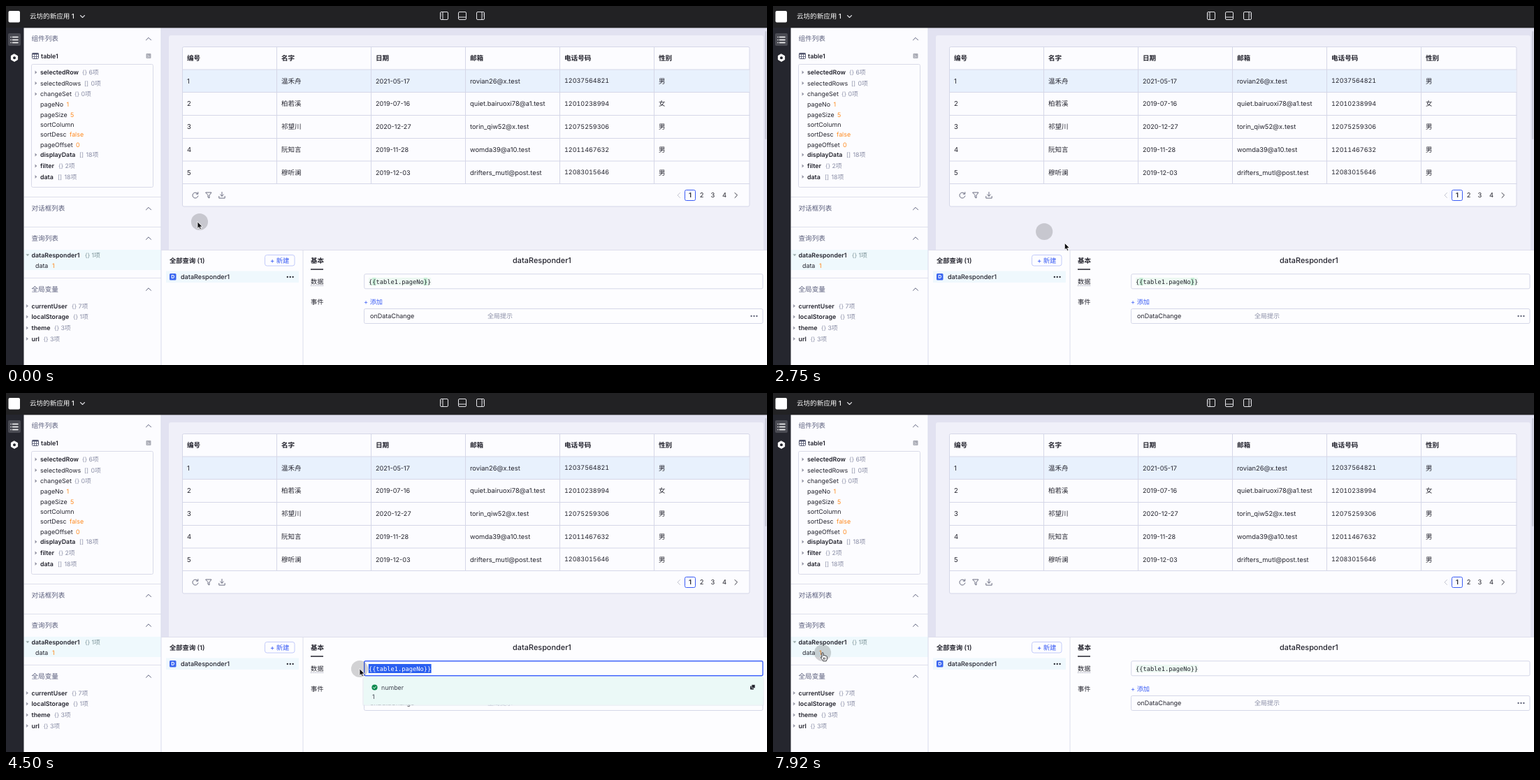
An HTML page that plays this animation: 1089x514 px, repeating every 8000 ms.

```html
<!DOCTYPE html>
<html lang="zh-CN">
<head>
<meta charset="utf-8">
<title>云坊的新应用 1</title>
<style>
html, body { margin: 0; width: 100%; height: 100%; overflow: hidden; background: #fcfcff; }
svg { display: block; width: 1089px; height: 514px; }
text { font-family: Inter, "Noto Sans CJK SC", "Noto Sans CJK", "Noto Sans", sans-serif; white-space: pre; text-rendering: geometricPrecision; }
.mono { font-family: "DejaVu Sans Mono", "Noto Sans Mono", monospace; }
.tab { font-variant-numeric: tabular-nums; }
</style>
</head>
<body>
<svg id="stage" viewBox="0 0 1089 514" xmlns="http://www.w3.org/2000/svg"></svg>
<script>
const INK = '#24242e', GREY = '#8a8ea6', HEAD = '#5d617e', ORANGE = '#ff8a1f', BLUE = '#3a5cf5', LINE = '#d5d7e8';

// y is the optical middle of the text
const text = (x, y, s, o = {}) =>
  `<text x="${x}" y="${y + (o.size || 8.85) * 0.36}" font-size="${o.size || 8.85}" font-weight="${o.w || 400}" fill="${o.c || INK}" text-anchor="${o.a || 'start'}" class="${o.k || ''}">${s}</text>`;
const rect = (x, y, w, h, fill, extra = '') =>
  `<rect x="${x}" y="${y}" width="${w}" height="${h}" fill="${fill}" ${extra}/>`;
const frame = (x, y, w, h, stroke, r = 2, fill = 'none') =>
  rect(x, y, w, h, fill, `stroke="${stroke}" rx="${r}"`);
const path = (d, stroke, w = 1, fill = 'none') =>
  `<path d="${d}" stroke="${stroke}" stroke-width="${w}" fill="${fill}" stroke-linecap="round" stroke-linejoin="round"/>`;
const rule = (x, y, x2, y2, c = LINE) => path(`M${x} ${y}L${x2} ${y2}`, c);
const dots = (x, y, c) => [0, 3.9, 7.8].map(d => `<circle cx="${x + d}" cy="${y}" r="1.15" fill="${c}"/>`).join('');
const group = (id, body, extra = '') => `<g id="${id}" ${extra}>${body}</g>`;

function topBar() {
  const icon = (x, d) => frame(x - 5.5, 8.5, 11, 11, '#e4e4e8', 1.5) + path(d, '#e4e4e8');
  return rect(0, 0, 1089, 31.35, '#222224') + rect(0, 31, 25.5, 483, '#25262e') +
    rect(3.5, 7, 16.5, 16.5, '#fff', 'rx="2"') +
    text(34, 15, '云坊的新应用 1', { size: 9.55, w: 500, c: '#fff' }) +
    path('M106.5 13.5l3 3l3 -3', '#d8d8dc', 1.1) +
    icon(627, 'M625 8.5v11M623 11.5h0M623 14h0') + icon(653, 'M647.5 16h11') + icon(679, 'M681 8.5v11M683 11.5h0M683 14h0') +
    rect(3, 39, 18, 18, '#4a4b53', 'rx="2"') +
    path('M9.5 44.5h7.5M9.5 48.5h7.5M9.5 52.5h7.5M7 44.5h0M7 48.5h0M7 52.5h0', '#fff', 1.5) +
    path('M12 69l4.6 2.6v5.2l-4.6 2.6l-4.6 -2.6v-5.2z', '#fff', 1, '#fff') + '<circle cx="12" cy="74.2" r="2" fill="#25262e"/>';
}

function sidePanel() {
  const section = (y, s) => text(36.5, y, s, { size: 9.6, w: 500, c: HEAD }) +
    path(`M200.5 ${y + 1.8}l3.5 -3.5l3.5 3.5`, HEAD);
  const arrow = (x, y) => path(`M${x - 1} ${y - 2}l2.4 2l-2.4 2z`, '#8e90a0', .3, '#8e90a0');
  // name, x, y, bracket, bracket x, count
  const node = (s, x, y, b, bx, n, w = 600) => arrow(x - 6.2, y) + text(x, y, s, { w }) +
    text(bx, y, b, { c: GREY, size: 8.4 }) + text(bx + 9.4, y, n + '项', { c: GREY });
  const prop = (s, x, y, vx, v) => text(x, y, s) + (v ? text(vx, y, v, { c: ORANGE }) : '');
  return rect(25.5, 31, 196.5, 483, '#fcfcff') + rect(25.5, 349, 196.5, 29, '#eff9fd') +
    section(47, '组件列表') + section(290, '对话框列表') + section(332.5, '查询列表') + section(405.5, '全局变量') +
    frame(37.5, 67.5, 9, 8, '#555970', 1) + rect(37.5, 67.5, 9, 2, '#555970') + path('M37.5 72.5h9M40.5 69v6.5M43.5 69v6.5', '#555970', .8) +
    text(50, 71.5, 'table1', { w: 600 }) +
    rect(200.5, 68, 7, 7, '#a9abb5', 'rx="1"') + path('M202.3 70l3.4 3.2M202.3 73.2h1.5', '#f0f0f4', .7) +
    frame(36.5, 83.5, 174, 176, '#d9dae8') +
    node('selectedRow', 49, 95, '{}', 109, 6) + node('selectedRows', 49, 110.5, '[]', 112, 0, 400) +
    node('changeSet', 49, 126, '{}', 98, 0, 400) +
    prop('pageNo', 49, 141, 86.5, '1') + prop('pageSize', 49, 155.5, 92, '5') + prop('sortColumn', 49, 170) +
    prop('sortDesc', 49, 184, 91, 'false') + prop('pageOffset', 49, 198.5, 100, '0') +
    node('displayData', 49, 213, '[]', 105, 18) + node('filter', 49, 229, '{}', 75, 2) + node('data', 49, 244.5, '[]', 74, 18) +
    [273.5, 316.5, 389.5].map(y => rule(26, y, 222, y, '#dfe0ec')).join('') +
    path('M29 355.4h4l-2 2.4z', '#8ea0a0', .3, '#8ea0a0') +
    text(36.5, 356.5, 'dataResponder1', { w: 600 }) +
    text(113, 356.5, '{}', { c: '#7c9499', size: 8.4 }) + text(122.5, 356.5, '1项', { c: '#7c9499' }) +
    prop('data', 42, 371.5, 66, '1') +
    node('currentUser', 36.5, 429.5, '{}', 94, 7) + node('localStorage', 36.5, 445, '{}', 96, 1) +
    node('theme', 36.5, 461, '{}', 69, 3) + node('url', 36.5, 476.5, '{}', 53.5, 3);
}

const COLS = [253, 388, 523, 658, 793, 928];
const ROWS = [59, 91, 123.5, 156.5, 189.5, 222, 254.5];
const PEOPLE = [
  ['1', '温禾舟', '2021-05-17', 'rovian26@x.test', '12037564821', '男'],
  ['2', '柏若溪', '2019-07-16', 'quiet.bairuoxi78@a1.test', '12010238994', '女'],
  ['3', '祁望川', '2020-12-27', 'torin_qiw52@x.test', '12075259306', '男'],
  ['4', '阮知言', '2019-11-28', 'womda39@a10.test', '12011467632', '男'],
  ['5', '穆听澜', '2019-12-03', 'drifters_mutl@post.test', '12083015646', '男']
];

function canvasArea() {
  const heads = ['编号', '名字', '日期', '邮箱', '电话号码', '性别'];
  const sizes = [9.5, 9.5, 9.1, 9.35, 9, 9.5];
  let s = rect(222, 31, 867, 320, '#e2e2f1') + rect(233, 42, 851, 320, '#f0f0f9', 'rx="3"') +
    rect(1086, 36, 2.5, 155, '#c9cad8', 'rx="1.2"') +
    frame(252.5, 58.5, 811.5, 228.5, LINE, 2, '#fcfcff') +
    rect(253, 91, 810.5, 32.5, '#e8f1fd') + group('hover', rect(253, 222, 810.5, 32.5, '#f4f6fe'), 'display="none"');
  ROWS.slice(1).forEach(y => s += rule(253, y, 1064, y));
  COLS.slice(1).forEach(x => s += rule(x - .5, 59, x - .5, 254.5));
  heads.forEach((h, i) => s += text(COLS[i] + 6, 75, h, { size: 9.6, w: 600 }));
  PEOPLE.forEach((p, r) => p.forEach((v, i) =>
    s += text(COLS[i] + 6, (ROWS[r + 1] + ROWS[r + 2]) / 2, v, { size: sizes[i], k: i === 4 ? 'tab' : '' })));
  const c = '#5a5d72';
  s += path('M274.3 268.8a4 4 0 1 0 .6 3.2M274.8 266.6v2.6h-2.6', c, .9) +
    path('M286 267h8l-3 4v4l-2 -1.2v-2.8z', c, .9) +
    path('M309 266.5v5.6M306.6 270l2.4 2.3l2.4 -2.3M304.8 272.5v2.6h8.4v-2.6', c, .9) +
    path('M964.5 267.5l-3.5 3.5l3.5 3.5', '#c4c6d2') + path('M1043 267.5l3.5 3.5l-3.5 3.5', '#33343f') +
    frame(971.5, 263.5, 15, 15, BLUE);
  [979, 995.5, 1011.5, 1028].forEach((x, i) => s += text(x, 271, i + 1, { size: 9.4, w: i ? 400 : 600, a: 'middle' }));
  return s;
}

const CODE = '{{table1.pageNo}}', CODE_X = 519, CHAR = 5.25;
const code = c => text(CODE_X, 394.5, CODE, { size: 8.72, c, k: 'mono' });

function queryPanel() {
  const match = x => rect(x, 389, CHAR, 11, '#c9efd8');
  const popup = rect(510, 407, 575, 41, '#dfe6ee', 'opacity=".5" rx="2"') + rect(512, 406, 571.5, 40.5, '#ebf9f7') +
    '<circle cx="527.5" cy="421.5" r="4.1" fill="#0e8a4f"/>' + path('M525.6 421.6l1.4 1.4l2.4 -2.7', '#fff', .9) +
    text(537, 421.5, 'number', { c: '#3f434f' }) + text(524, 435, '1', { c: '#3f434f' }) +
    rect(1065, 419.5, 5, 5, INK, 'rx=".8"') + rect(1067, 417.5, 5, 5, INK, 'rx=".8" stroke="#ebf9f7" stroke-width=".7"');
  return rect(222, 349, 867, 1.5, '#dedeec') + rect(222, 350, 867, 164, '#fdfdff') +
    rule(222, 31, 222, 514, '#d9dbec') + rule(425, 350, 425, 514, '#dcdeec') +
    text(234, 364.5, '全部查询 (1)', { size: 9.3, w: 600 }) +
    frame(370.5, 356.5, 42.5, 15.5, '#c3cbfa', 3, '#fdfdff') + text(391.7, 364.5, '+ 新建', { size: 9.4, w: 500, c: BLUE, a: 'middle' }) +
    rect(229, 379.5, 190, 16.5, '#eff8fd') + rect(234, 383, 9.5, 9.5, '#3a66f0', 'rx="1.5"') +
    text(238.8, 387.8, 'D', { size: 7, w: 700, c: '#fff', a: 'middle' }) +
    text(250, 387.8, 'dataResponder1', { size: 9.1, w: 500 }) + dots(402.8, 388, INK) +
    text(436, 364.5, '基本', { size: 9.5, w: 600 }) + rect(436, 376.3, 18, 1.5, INK) +
    text(767, 364.5, 'dataResponder1', { size: 10.9, w: 500, a: 'middle' }) +
    text(436, 394.5, '数据', { size: 9.2 }) + '<path d="M436 400.5h18" stroke="#9a9cb0" stroke-dasharray="1.4 1.4"/>' +
    text(436, 423.5, '事件', { size: 9.2 }) + text(512, 423.5, '+ 添加', { size: 9.2, c: BLUE }) +
    frame(512.5, 433.5, 570.5, 21, LINE) + text(521, 444, 'onDataChange', { size: 9 }) +
    text(689, 444, '全局提示', { size: 9, c: GREY }) + dots(1066.6, 444, '#5d6076') +
    group('popup', popup) +
    '<rect id="field" x="512.7" y="383.8" width="570.3" height="21" rx="2" fill="#fdfdff"/>' +
    rect(CODE_X, 389, CHAR * 17, 11, '#edf9f2') +
    group('match', match(CODE_X + CHAR) + match(CODE_X + CHAR * 15)) + code(INK) +
    group('expand', frame(1068, 389.5, 9.5, 9, '#c4c6d0', 1.5) + path('M1070.5 392h1.5M1070.5 392v1.5M1071 392.5l4 3.5M1075 394.5v1.5h-1.5', '#8a8da0', .8)) +
    '<clipPath id="clip"><rect id="clipBox" y="386" height="17"/></clipPath>' +
    group('pick', rect(CODE_X - .5, 388, CHAR * 17 + 1, 13, '#2a5ff0') + code('#fff'), 'clip-path="url(#clip)"');
}

const tip = rect(98.5, 131, 122, 24, '#9a9ab0', 'opacity=".18" rx="4"') + rect(98.5, 129.5, 121.5, 23, '#29292c', 'rx="2"') +
  text(104, 141.2, '当前展示第几页，从1开始', { size: 9.6, c: '#fff' });

const pointer =
  group('arrow', path('M0 0v9.6l2.2 -2l1.5 3.4l1.7 -.8l-1.5 -3.2h3z', '#fff', .8, '#0c0c10')) +
  group('hand', path('M-1.2 .8a1.1 1.1 0 0 1 2.2 0v3.4l.4 -.4a1 1 0 0 1 1.7 .5a1 1 0 0 1 1.7 .5a1 1 0 0 1 1.5 .9v2.5c0 2 -1 2.4 -1 3.6h-4.6c-.4 -1.8 -2 -2.6 -3 -4.6c-.5 -1.2 .5 -1.7 1.1 -1zM1.4 7v2.4M3.2 7v2.4', '#16161a', .85, '#fff')) +
  group('beam', path('M-2 -5.5q2 0 2 1.5v8q0 1.5 -2 1.5M2 -5.5q-2 0 -2 1.5v8q0 1.5 2 1.5M-1.2 1.5h2.4', '#2a2a30', .9));

document.getElementById('stage').innerHTML = canvasArea() + sidePanel() + queryPanel() + topBar() + group('tip', tip) +
  '<g id="halo"><circle r="12.1" fill="#000" fill-opacity=".17"/><circle id="press" r="8" fill="#000" fill-opacity=".2"/></g>' + group('pointer', pointer);

const LOOP = 8000, STEP = 1000 / 12;
const lin = u => u, out = u => 1 - (1 - u) ** 2, both = u => u * u * (3 - 2 * u);

// time, x, y, easing towards this point
const MOVES = [
  [-84, 277, 309, lin], [0, 274, 309, lin], [833, 62, 141, both], [2250, 62, 141, lin], [2333, 76, 146, lin],
  [2833, 427, 345, out], [2917, 427, 345, lin], [3333, 611, 392, out], [3500, 614, 394, out], [3833, 613, 394, lin],
  [4417, 506, 395, both], [4833, 506, 395, lin], [5000, 498, 402, lin], [6167, 498, 402, lin],
  [7000, 84, 359, both], [7083, 84, 359, lin], [7750, 71, 372, both]
];

function place(t) {
  const i = MOVES.findIndex(m => m[0] >= t);
  if (i < 0) return MOVES[MOVES.length - 1].slice(1, 3);
  if (i === 0) return MOVES[0].slice(1, 3);
  const a = MOVES[i - 1], b = MOVES[i], u = b[3]((t - a[0]) / (b[0] - a[0]));
  return [a[1] + (b[1] - a[1]) * u, a[2] + (b[2] - a[2]) * u];
}

const el = id => document.getElementById(id);
const show = (id, on) => el(id).setAttribute('display', on ? 'inline' : 'none');
const move = (id, p) => el(id).setAttribute('transform', `translate(${p[0].toFixed(2)} ${p[1].toFixed(2)})`);
const within = (t, a, b) => t >= a && t < b;

function draw(now) {
  const t = Math.floor((now % LOOP + 5) / STEP) * STEP + 1;
  const p = place(t - 1), [x, y] = p;
  move('pointer', p);
  move('halo', place(t - 1 - STEP));

  const inField = within(x, 512, 1083) && within(y, 383, 405);
  const onTree = x < 211 && (within(y, 88, 251) || within(y, 349, 378));
  const onItem = within(x, 229, 419) && within(y, 380, 396);
  show('beam', inField);
  show('hand', onTree || onItem);
  show('arrow', !inField && !onTree && !onItem);
  show('hover', within(x, 253, 1064) && within(y, 222, 254.5));
  show('press', within(t, 917, 1500) || within(t, 3667, 3833) || within(t, 5333, 5917));

  el('tip').setAttribute('opacity', within(t, 1000, 2417) ? 1 : within(t, 916, 2500) ? .5 : 0);

  const focus = within(t, 3667, 5417);
  show('popup', focus);
  show('expand', inField && !focus);
  show('match', t < 3667);
  el('field').setAttribute('stroke', focus ? '#4065fa' : inField ? '#a3a5b0' : LINE);
  el('field').setAttribute('stroke-width', focus ? 1.4 : 1);

  const from = Math.min(17, Math.max(0, Math.round((x - CODE_X) / CHAR)));
  const picked = within(t, 3833, 5417) && from < 17;
  show('pick', picked);
  const left = CODE_X + from * CHAR - (from ? 0 : .5);
  el('clipBox').setAttribute('x', left);
  el('clipBox').setAttribute('width', CODE_X + 17 * CHAR + .5 - left);
}

const start = performance.now();
function tick() {
  draw(performance.now() - start);
  requestAnimationFrame(tick);
}
tick();
</script>
</body>
</html>
```
